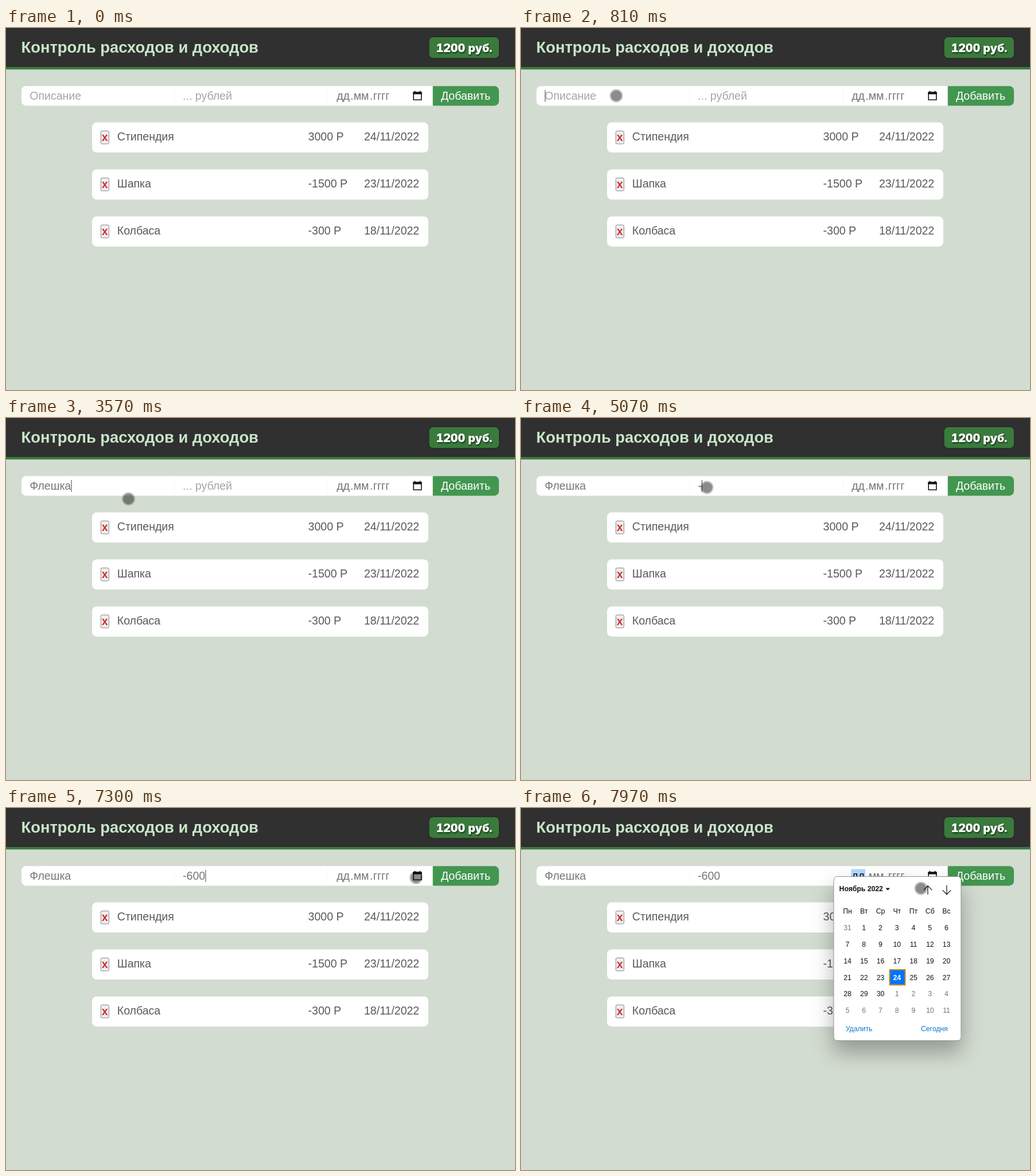
These frames come from a looping animation (887 px wide and 631 px high, 8 s). An HTML page:

```html
<!DOCTYPE html>
<html lang="ru">
<head>
<meta charset="utf-8">
<title>Контроль расходов и доходов</title>
<style>
html, body { margin: 0; width: 100%; height: 100%; overflow: hidden; background: #d3dcd1; }
svg { display: block; font: 19.53px "Liberation Sans", Arial, sans-serif; }
text { white-space: pre; }
.mid { text-anchor: middle; }
.bold { font-weight: bold; }
.hint { fill: #a2a8a1; }
.typed { fill: #777; }
.item { fill: #595959; }
.badge { filter: drop-shadow(0 0 1.5px #0006); }
.sum { font: 900 19.53px Inter, "DejaVu Sans", sans-serif; font-variant-numeric: tabular-nums;
  fill: #fff; filter: drop-shadow(1px 2px 1px #0009); }
#popup { font-size: 12.2px; }
.panel { fill: #fff; stroke: #8d938c; filter: drop-shadow(0 20px 18px rgba(0,0,0,.3)); }
.line { fill: none; stroke: #111; stroke-width: 1.2; }
.link { fill: #0a78cc; }
</style>
</head>
<body>
<svg id="stage" width="887" height="631" viewBox="0 0 887 631">
  <rect width="887" height="631" fill="#d3dcd1"/>
  <rect width="887" height="68" fill="#303030"/>
  <rect y="68" width="887" height="4.3" fill="#3a7b3d"/>
  <text class="bold" x="26.5" y="43" font-size="27.35" fill="#c8e6c9">Контроль расходов и доходов</text>
  <rect class="badge" x="737.5" y="16" width="121.5" height="36.3" rx="7" fill="#3a7a3c"/>
  <text class="sum mid" x="798.5" y="41.5">1200 руб.</text>

  <rect x="27" y="101.2" width="740" height="34.2" rx="8" fill="#fff"/>
  <path d="M293.5 101.2v34.2M560.5 101.2v34.2" stroke="#f6f8f6"/>
  <path d="M743.7 101.2H851a8 8 0 0 1 8 8v18.2a8 8 0 0 1-8 8H743.7z" fill="#439650"/>
  <text class="mid" x="801" y="124.8" fill="#fff">Добавить</text>
  <text id="name" x="41.3" y="124.8"></text>
  <text id="sum" x="308.1" y="124.8"></text>
  <rect id="mark" x="575.3" y="106.5" width="24.7" height="22.6" fill="#b3d7ff"/>
  <g fill="#757575">
    <text id="day" x="576.2" y="124.8">дд</text>
    <text x="600" y="124.8">.</text>
    <text x="605.7" y="124.8">мм</text>
    <text x="634" y="124.8">.</text>
    <text x="639.8" y="124.8">гггг</text>
  </g>
  <rect id="caret" y="108" width="1.1" height="20.7" fill="#555"/>
  <g id="items"></g>
  <g id="popup"></g>
  <g id="icon"></g>
  <g id="cursor">
    <circle r="11.5" fill="#000" fill-opacity=".23"/>
    <circle r="9.3" fill="#000" fill-opacity=".29"/>
  </g>
</svg>
<script>
const LOOP = 8000;
const $ = id => document.getElementById(id);
const show = (el, on) => el.setAttribute('visibility', on ? 'visible' : 'hidden');
const label = (x, y, s, cls = '', fill = '') =>
  `<text x="${x}" y="${y}" class="${cls}"${fill && ` fill="${fill}"`}>${s}</text>`;

$('items').innerHTML = [
  ['Стипендия', '3000 Р', '24/11/2022'],
  ['Шапка', '-1500 Р', '23/11/2022'],
  ['Колбаса', '-300 Р', '18/11/2022']
].map(([name, sum, date], i) => `<g transform="translate(0 ${i * 81.9})">
  <rect x="150" y="164.6" width="586" height="52.5" rx="8" fill="#fff"/>
  <rect x="165.3" y="179.5" width="14" height="22.5" rx="2" fill="#efefef" stroke="#858585"/>
  ${label(172.2, 197.2, 'x', 'mid bold', '#d32f2f')}
  ${label(193.8, 196.4, name, 'item')}${label(526.6, 196.4, sum, 'item')}
  ${label(624, 196.4, date, 'item')}</g>`).join('');

// the calendar glyph sits under the popup once that has moved up
$('icon').innerHTML = `<path d="M710.2 112.2h13.6v13h-13.6z" fill="none" stroke="#111" stroke-width="1.6"/>
  <path d="M709.4 111.4h15.2v4h-15.2zM711.5 109.8h2v2h-2zM720.5 109.8h2v2h-2z" fill="#111"/>`;
$('stage').insertBefore($('icon'), $('popup'));

function calendar() {
  const col = i => 24.6 + 28.75 * i;
  let s = `<rect class="panel" x=".5" y=".7" width="222" height="286" rx="6"/>
    ${label(10.2, 26.6, 'Ноябрь 2022', 'bold', '#111')}
    <path d="M91 20.8h7.6l-3.8 4z" fill="#111"/>
    <path class="line" d="M164.5 32V17M157.2 24.3l7.3-7.5 7.3 7.5M197.5 16v15.7M190.2 24.4l7.3 7.5 7.3-7.5"/>`;
  ['Пн', 'Вт', 'Ср', 'Чт', 'Пт', 'Сб', 'Вс'].forEach((d, i) => s += label(col(i), 65.2, d, 'mid', '#111'));
  s += '<rect x="98" y="163" width="27" height="26.6" fill="#0075ff" stroke="#cb8a1c" stroke-width="2"/>';
  for (let n = 0; n < 42; n++) {
    const inside = n > 0 && n < 31, today = n === 24;
    const color = today ? '#fff' : inside ? '#111' : '#757575';
    s += label(col(n % 7), 94.5 + 28.75 * Math.floor(n / 7), n ? (n - 1) % 30 + 1 : 31,
      today ? 'mid bold' : 'mid', color);
  }
  return s + label(21.4, 270.5, 'Удалить', 'link') + label(152.6, 270.5, 'Сегодня', 'link');
}
$('popup').innerHTML = calendar();

const fields = [
  { el: $('name'), hint: 'Описание', text: 'Флешка', keys: [1680, 1880, 2110, 2820, 3050, 3210] },
  { el: $('sum'), hint: '... рублей', text: '-600', keys: [5070, 5530, 5790, 6000] }
];
const SECOND = 4060, PICK = 7500, OPEN = 7560, SHIFT = 7650;
const caretOn = [[740, 1240], [1680, 2620], [2820, 3720], [SECOND, 4560], [5070, 6510], [6960, PICK]];

// start, end, then start point, control point and end point
const moves = [
  [60, 740, 494, 612, 300, 300, 166, 118],
  [3410, 4060, 166, 118, 202, 163.5, 324, 121],
  [6870, 7350, 324, 121, 555, 185, 718, 120],
  [7760, 7970, 718, 120, 710, 131, 697, 140]
];

function cursorAt(t) {
  const [t0, t1, x0, y0, cx, cy, x1, y1] = moves.findLast(m => t >= m[0]) || moves[0];
  const u = Math.min(1, Math.max(0, (t - t0) / (t1 - t0)));
  const s = 1 - (1 - u) ** 2;
  const bend = (a, b, c) => (1 - s) ** 2 * a + 2 * s * (1 - s) * b + s * s * c;
  return [bend(x0, cx, x1), bend(y0, cy, y1)];
}

function draw(t) {
  for (const { el, hint, text, keys } of fields) {
    const count = keys.filter(k => t >= k).length;
    el.textContent = count ? text.slice(0, count) : hint;
    el.setAttribute('class', count ? 'typed' : 'hint');
  }
  const { el, keys } = fields[t < SECOND ? 0 : 1];
  const width = t >= keys[0] ? el.getComputedTextLength() : 0;
  $('caret').setAttribute('x', +el.getAttribute('x') + width + 0.2);
  show($('caret'), caretOn.some(([a, b]) => t >= a && t < b));

  show($('mark'), t >= PICK);
  $('day').setAttribute('fill', t >= PICK ? '#111' : '#757575');
  show($('popup'), t >= OPEN);
  $('popup').setAttribute('transform', t < SHIFT ? 'translate(557.7 132)' : 'translate(544.4 118.8)');

  show($('cursor'), t >= 80);
  $('cursor').setAttribute('transform', `translate(${cursorAt(t)})`);
}

function tick() {
  draw(performance.now() % LOOP);
  requestAnimationFrame(tick);
}
tick();
</script>
</body>
</html>
```
